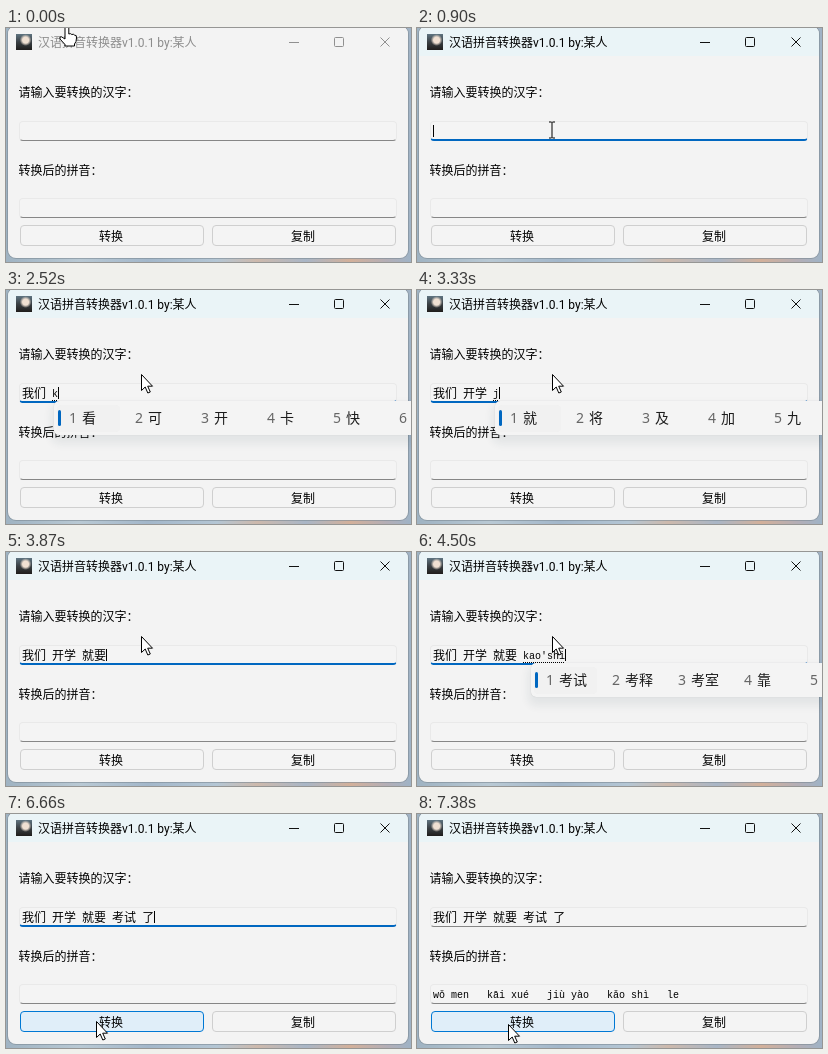
These frames come from a looping animation (405 by 234 pixels, 8 s). An HTML page:

```html
<!DOCTYPE html>
<html lang="zh-CN">
<head>
<meta charset="utf-8">
<title>汉语拼音转换器</title>
<style>
  html, body { margin: 0; width: 100%; height: 100%; overflow: hidden; }
  body { background: #a9bac8; }
  #stage {
    position: relative; width: 405px; height: 234px; overflow: hidden;
    background: linear-gradient(90deg, #9fb3c2, #b9c9d4 18%, #a3b7ca 35%, #b4c6d4 52%, #cdb9ac 62%, #a9b6c6 74%, #d3b09a 85%, #b3aeb6 94%, #9fb3c6);
    font: 12px/16px "Noto Sans CJK SC", "Noto Sans CJK", sans-serif; color: #000;
  }
  #stage * { box-sizing: border-box; }
  #stage div, #stage svg { position: absolute; white-space: pre; }
  #window {
    left: 2px; top: -2px; width: 400px; height: 232px; overflow: hidden;
    background: #f3f3f3; border-radius: 8px; box-shadow: 0 0 0 1px #7d8a9499;
  }
  #bar { left: 0; top: 0; width: 400px; height: 30px; }
  #title { left: 32px; top: 6.5px; font-family: Roboto, "Noto Sans CJK SC", "Noto Sans CJK", sans-serif; }
  #icon {
    left: 10px; top: 6px; width: 16px; height: 16px;
    background: radial-gradient(circle at 60% 38%, #f0e0d2 0 22%, #0000 42%), linear-gradient(#5f7480, #3a4044 50%, #1f1d1c);
  }
  .field {
    left: 13px; width: 378px; height: 20px; border: 1px solid #e9e9e9;
    border-bottom-color: #868686; border-radius: 4px; background: #f4f4f4;
  }
  .field.focus { border-bottom: 2px solid #0067c0; }
  .text { left: 16px; }
  .text i { position: relative; top: -1px; font: 10px/0 "Liberation Mono", monospace; }
  .text u { text-decoration: underline dotted 1px; text-underline-offset: 2px; }
  #caret { top: 97px; width: 1px; height: 12px; background: #000; }
  .button {
    top: 197px; width: 184px; height: 21px; line-height: 20px; padding-right: 2px;
    text-align: center; background: #f4f4f4; border: 1px solid #cfcfcf; border-radius: 4px;
  }
  .button.hover { background: #e0eef9; border-color: #0078d4; }
  .button.down { background: #cce4f7; border-color: #005499; }
  #popup {
    top: 111px; width: 480px; height: 34px; background: #f4f4f4; border-radius: 5px;
    box-shadow: 0 6px 8px 3px #1a384a12, 0 0 1px #0003;
  }
  #popup .pick { left: 3px; top: 4px; width: 63px; height: 27px; border-radius: 4px; background: #f1f1f1; }
  #popup .mark { left: 4px; top: 9px; width: 3px; height: 16px; border-radius: 2px; background: #0067c0; }
  #list { left: 15px; top: 8px; display: flex; font: 14px/18px "Noto Sans", "Noto Sans CJK SC", "Noto Sans CJK", sans-serif; color: #1c1c1c; }
  #list span { min-width: 66px; padding-right: 24px; flex: none; }
  #list b { display: inline-block; width: 13px; font-weight: 400; color: #666; }
  svg { overflow: visible; fill: none; }
  #mouse { left: -1px; top: 0; width: 1px; height: 1px; }
  #mouse path { fill: #fff; stroke: #000; stroke-linejoin: round; }
  #mouse #beam { fill: none; }
</style>
</head>
<body>
<div id="stage">
  <div id="window"><div id="bar"></div></div>
  <div id="icon"></div>
  <div id="title">汉语拼音转换器v1.0.1 by:某人</div>
  <svg id="controls" width="405" height="30">
    <path d="M283 14.5h10M374.5 9.5l9 9m0-9l-9 9"/>
    <rect x="328.500" y="9.500" width="9" height="9" rx="1"/>
  </svg>
  <div style="left:12.5px;top:56px">请输入要转换的汉字：</div>
  <div style="left:12.5px;top:134px">转换后的拼音：</div>
  <div id="input" class="field" style="top:93px"></div>
  <div class="field" style="top:170px"></div>
  <div id="typed" class="text" style="top:95px"></div>
  <div id="caret"></div>
  <div id="result" class="text" style="top:172px"></div>
  <div id="convert" class="button" style="left:14px">转换</div>
  <div class="button" style="left:206px">复制</div>
  <div id="popup"><div class="pick"></div><div class="mark"></div><div id="list"></div></div>
  <svg id="mouse">
    <path id="arrow" d="M.5.5V16.500L4.200 13 6.800 19 9.300 18 6.700 12.200H11.500Z"/>
    <path id="beam" d="M-3-8h2.500l.5.500.5-.5H3M0-7.500v15M-3 8h2.500l.5-.5.5.500H3"/>
    <path id="hand" d="M-2 13V1.500a1.900 1.900 0 0 1 3.800 0V8q1.800-1 3 .5 1.800-.8 2.700.6Q10 8.800 9.500 12q0 4-2 6v2H-2v-1.500L-7 13q-1-2.500 1.500-2.200Z"/>
  </svg>
</div>
<script>
const LOOP = 8000, TICK = 90;
const el = id => document.getElementById(id);

// [time, committed text, composing text, candidates]
const typing = [
  [0, ''],
  [1530, '', 'w', '我 为 无 问 玩 外'],
  [1620, '', 'wo', '我 握 窝 卧 喔 沃'],
  [1710, '', "wo'm", '我们 我 握 卧 喔'],
  [1800, '', "wo'me", '我么 women 我 卧 喔'],
  [1890, '', "wo'men", '我们 women 我 卧 喔'],
  [1980, '我们'],
  [2070, '我们 '],
  [2520, '我们 ', 'k', '看 可 开 卡 快 考'],
  [2610, '我们 ', 'ka', '卡 咖 喀 咔 佧'],
  [2700, '我们 ', 'kai', '开 凯 楷 慨 揩'],
  [2790, '我们 ', "kai'x", '开心 开学 开 凯 楷'],
  [2880, '我们 ', "kai'xue", '开学 开 凯 楷 慨'],
  [2970, '我们 开学'],
  [3060, '我们 开学 '],
  [3330, '我们 开学 ', 'j', '就 将 及 加 九'],
  [3420, '我们 开学 ', 'ji', '及 级 几 机 记'],
  [3510, '我们 开学 ', 'jiu', '就 九 旧 久 酒'],
  [3600, '我们 开学 ', "jiu'y", '就要 就有 就 九 旧'],
  [3690, '我们 开学 ', "jiu'ya", '就要 就 九 旧 久'],
  [3780, '我们 开学 ', "jiu'yao", '就要 就 九 旧 久'],
  [3870, '我们 开学 就要'],
  [3960, '我们 开学 就要 '],
  [4140, '我们 开学 就要 ', 'k', '看 可 开 卡 快'],
  [4230, '我们 开学 就要 ', 'ka', '卡 咖 喀 咔 佧'],
  [4320, '我们 开学 就要 ', 'kao', '靠 考 烤 拷 铐'],
  [4410, '我们 开学 就要 ', "kao's", '考试 考上 考生 靠 考'],
  [4500, '我们 开学 就要 ', "kao'shi", '考试 考释 考室 靠 考'],
  [4680, '我们 开学 就要 考试'],
  [4860, '我们 开学 就要 考试 '],
  [4950, '我们 开学 就要 考试 ', 'l', '了 来 里 老 啦'],
  [5040, '我们 开学 就要 考试 ', 'le', '了 乐 勒 叻 泐'],
  [5400, '我们 开学 就要 考试 了'],
];
// [time, x, y]
const path = [
  [0, 62, -2], [810, 136, 102], [900, 136, 102], [1170, 136, 84],
  [6120, 136, 84], [6750, 88, 214], [6930, 92, 210], [LOOP, 92, 210],
];
const caretOff = [[2340, 2520], [5400, 5940], [6030, 6480]];
const pinyin = 'wǒ men   kāi xué   jiù yào   kǎo shì   le';

const within = (t, from, to) => t >= from && t < to;
const show = (node, on) => { node.style.visibility = on ? 'visible' : 'hidden'; };
const narrow = s => s.replace(/[^\u4e00-\u9fff]+/g, '<i>$&</i>');
const widthOf = s => [...s].reduce((w, c) => w + (c > '\u4e00' ? 12 : 6), 0);

function mouseAt(t) {
  const n = path.findIndex(p => p[0] > t);
  const [t0, x0, y0] = path[n - 1], [t1, x1, y1] = path[n];
  const u = (t - t0) / (t1 - t0), k = u * u * (3 - 2 * u);
  return [Math.round(x0 + (x1 - x0) * k), Math.round(y0 + (y1 - y0) * k)];
}

function drawMouse(t) {
  const [x, y] = mouseAt(t);
  const inField = x > 13 && x < 391 && y > 93 && y < 113 && t < 6120;
  const shape = t < TICK ? 'hand' : inField ? 'beam' : 'arrow';
  for (const id of ['hand', 'beam', 'arrow']) show(el(id), id === shape);
  el('mouse').style.transform = `translate(${x}px, ${y}px)`;
  const hover = x > 14 && x < 198 && y > 197 && y < 218;
  const down = within(t, 7110, 7380);
  el('convert').className = 'button' + (hover ? ' hover' : '') + (down ? ' down' : '');
}

function drawTyping(t, focus) {
  const [, done, composing = '', words = ''] = typing.findLast(s => s[0] <= t);
  el('typed').innerHTML = narrow(done) + (composing && `<u>${narrow(composing)}</u>`);
  const caret = 16 + widthOf(done + composing);
  el('caret').style.left = caret + 'px';
  show(el('caret'), focus && !caretOff.some(r => within(t, ...r)));
  show(el('popup'), words);
  el('popup').style.left = Math.min(caret - 4, 114) + 'px';
  el('list').innerHTML = words && words.split(' ')
    .map((w, i) => `<span><b>${i + 1}</b>${w}</span>`).join('');
}

function draw(t) {
  const active = t >= 810, focus = within(t, 900, 7110);
  el('bar').style.background = active ? '#eaf4f7' : '#f3f3f3';
  el('title').style.color = active ? '#000' : '#8c8c8c';
  el('controls').style.stroke = active ? '#111' : '#909090';
  el('input').className = focus ? 'field focus' : 'field';
  el('result').innerHTML = t >= 7200 ? `<i>${pinyin}</i>` : '';
  drawTyping(t, focus);
  drawMouse(t);
}

let start, last;
function frame(now) {
  start ??= now;
  const t = Math.floor((now - start) % LOOP / TICK) * TICK;
  if (t !== last) draw(last = t);
  requestAnimationFrame(frame);
}
draw(0);
requestAnimationFrame(frame);
</script>
</body>
</html>
```
